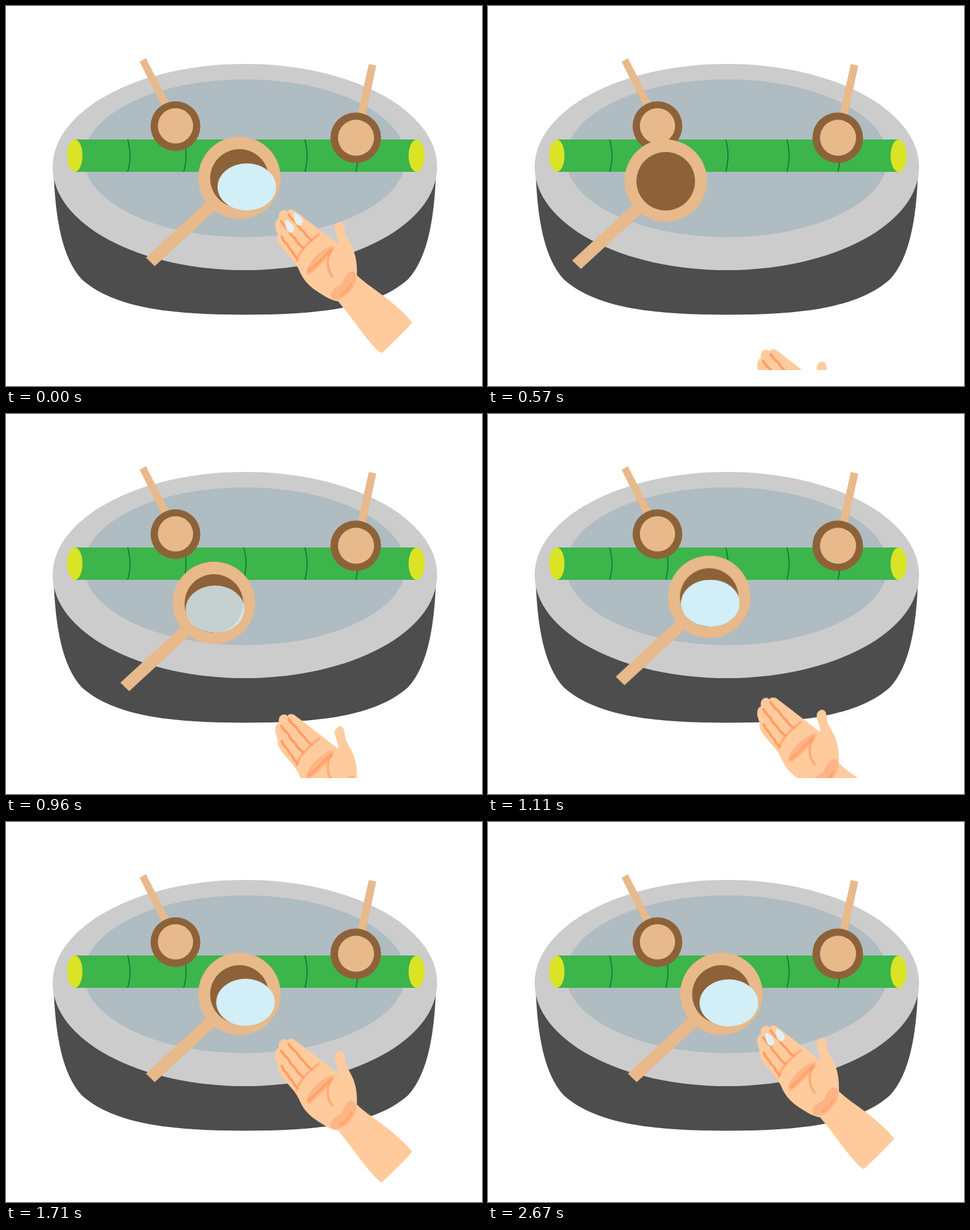
An HTML page without scripts for the animation above (2.7 s loop, 837 by 669 pixels).

```html
<!DOCTYPE html>
<html lang="en">
<head>
<meta charset="utf-8">
<title>Water basin</title>
<style>
  html, body { margin: 0; width: 100%; height: 100%; overflow: hidden; background: #fff; }
  svg { display: block; width: 837px; height: 669px; }

  .ladle, .water, .hand, .drop { animation: 2.7s step-end infinite; }
  .ladle { animation-name: scoop; }
  .water { animation-name: pour; }
  .hand { animation-name: rise; }
  .splash { animation-name: splash; }
  .trickle { animation-name: trickle; }
  .bead { animation-name: bead; }

  .wood { fill: #e8b98a; }
  .bark { fill: #8e6239; }
  .line { fill: none; stroke: #ff9f65; stroke-width: 4.5; stroke-linecap: round; stroke-linejoin: round; }

  @keyframes scoop {
    0% { transform: none; }
    16.66% { transform: translate(-109px, -6px); animation-timing-function: steps(4); }
    21.11% { transform: translate(-98px, 5px); animation-timing-function: steps(4); }
    25.55% { transform: translate(-84px, 18.5px); animation-timing-function: steps(4); }
    29.99% { transform: translate(-68px, 29.5px); animation-timing-function: steps(2); }
    32.22% { transform: translate(-59.5px, 31.5px); animation-timing-function: steps(4); }
    36.66% { transform: translate(-40px, 29.5px); animation-timing-function: steps(4); }
    41.11% { transform: translate(-21.5px, 19.5px); animation-timing-function: steps(4); }
    45.55% { transform: translate(-8px, 8px); animation-timing-function: steps(4); }
    49.99%, 100% { transform: none; }
  }

  /* offsets are relative to the ladle */
  @keyframes pour {
    0% { transform: none; opacity: 1; }
    16.66% { transform: translate(-11px, -5px); opacity: 0; }
    26.66% { transform: translate(-11px, -5px); opacity: 0; animation-timing-function: steps(10); }
    37.77% { transform: translate(-11px, -5px); opacity: 1; }
    51.11% { transform: translate(-11px, -5px); opacity: 1; animation-timing-function: steps(14); }
    66.66%, 100% { transform: none; opacity: 1; }
  }

  @keyframes rise {
    0% { transform: none; }
    16.66% { transform: translateY(269.5px); animation-timing-function: steps(46); }
    67.77%, 100% { transform: none; }
  }

  @keyframes splash {
    0% { transform: translate(484px, 380px); opacity: 0; }
    76.66% { transform: translate(484px, 380px); opacity: 1; }
    77.77% { transform: translate(487px, 385px); opacity: 1; }
    78.88% { transform: translate(491px, 390px); opacity: 1; }
    84.44%, 100% { transform: translate(491px, 390px); opacity: 0; }
  }

  @keyframes trickle {
    0%, 100% { transform: translate(498.5px, 387.5px); opacity: 1; }
    1.11% { transform: translate(501.5px, 392.5px); opacity: 1; }
    2.22% { transform: translate(480px, 357.5px); opacity: 0; }
    93.33% { transform: translate(480px, 357.5px); opacity: 1; animation-timing-function: steps(5); }
    98.88% { transform: translate(495.5px, 382.5px); opacity: 1; }
  }

  @keyframes bead {
    0% { transform: translate(513.5px, 375px); opacity: 1; }
    11.11% { transform: translate(480px, 350px); opacity: 0; }
    84.44% { transform: translate(480px, 350px); opacity: 1; animation-timing-function: steps(8); }
    93.33%, 100% { transform: translate(513.5px, 375px); opacity: 1; }
  }
</style>
</head>
<body>
<svg viewBox="0 0 837 669">
  <defs>
    <path id="joint" d="M0 235Q8 263 0 292" fill="none" stroke="#006837" stroke-width="1.4"/>
    <path id="drop" d="M-7-11.5C-8.5-3-6.500 5-2 9.500C2 13 8 10 8.500 4C7.500-3 0-9-7-11.500Z" fill="#e1f0f3"/>
    <clipPath id="stage"><path d="M0 0H837V641H0Z"/></clipPath>
  </defs>

  <!-- basin -->
  <path d="M84 296C87 376 99 444 133 481C190 532 290 543.500 420 543.500S650 532 707 481C741 444 753 376 756 296Z" fill="#4d4d4d"/>
  <ellipse cx="420" cy="283.500" rx="338" ry="181.500" fill="#ccc"/>
  <ellipse cx="420" cy="268" rx="283" ry="139" fill="#afbcc2"/>

  <!-- bamboo -->
  <path d="M121 235H722V292H121Z" fill="#3cb54a"/>
  <use href="#joint" x="214"/>
  <use href="#joint" x="312.500"/>
  <use href="#joint" x="418"/>
  <use href="#joint" x="525.500"/>
  <use href="#joint" x="615"/>
  <g fill="#dae324">
    <ellipse cx="121" cy="263.500" rx="13.500" ry="28.500"/>
    <ellipse cx="722" cy="263.500" rx="14" ry="28.500"/>
  </g>

  <!-- resting ladles -->
  <path class="wood" d="M235 98L246 92L288 174L276 180Z"/>
  <circle class="bark" cx="298" cy="211.500" r="43.700"/>
  <circle class="wood" cx="298" cy="211" r="31"/>
  <path class="wood" d="M638 102L651 105L632 194L618 192Z"/>
  <circle class="bark" cx="615" cy="232" r="44.500"/>
  <circle class="wood" cx="615.500" cy="232" r="31.700"/>

  <g class="ladle">
    <path class="wood" d="M246 443L358 340L374 354L261.500 458Z"/>
    <circle class="wood" cx="410.500" cy="302.500" r="72.500"/>
    <circle class="bark" cx="410.500" cy="303.500" r="51.500"/>
    <ellipse class="water" cx="423.500" cy="318.500" rx="51.500" ry="41.500" fill="#d2eef7"/>
  </g>

  <g clip-path="url(#stage)">
    <g class="hand">
      <path fill="#ffcb9d" d="M475 395C472 387 473 376 480 374C478 365 483 359 489 359Q493 359 495 362C498 356 506 358 511 363C530 377 556 398 584 419C585 408 578 400 578 389C580 380 590 376 594 385C597 396 595 402 602 412C613 431 618 446 617 474C632 489 653 501 676 520C690 532 704 544 714 557C706 568 681 592 661 611C653 608 647 599 635 586C617 563 602 541 584 520C573 519 560 511 545 501C530 491 521 479 515 464C508 451 506 450 496 438C487 427 475 416 478 404Z"/>
      <path fill="#ffb486" d="M530 473C524 466 533 453 544 441C557 429 571 420 577 423C579 428 569 439 559 450C548 461 537 473 530 473Z"/>
      <path fill="#ffb486" d="M572 515C569 506 573 498 585 493C594 488 593 478 600 471C606 464 614 466 616 476C617 488 609 500 600 508C592 515 579 520 572 515Z"/>
      <path class="line" stroke-opacity=".65" d="M511 448Q516 433 530 419Q541 409 550 402"/>
      <path class="line" d="M484 379Q490 389 497 394Q500 404 508 409Q513 419 523 426"/>
      <path class="line" d="M497 367Q503 377 511 382Q517 393 525 399Q530 408 538 412"/>
      <path class="line" d="M485 406Q488 415 495 420Q497 427 503 431Q506 440 513 445"/>
      <path class="line" stroke-opacity=".8" stroke-width="3" d="M533 466Q553 449 570 430"/>
      <path class="line" stroke-opacity=".7" d="M573 430C563 443 563 462 574 476"/>
      <path class="line" stroke-opacity=".7" d="M588 510Q598 503 607 490"/>
    </g>
  </g>

  <use class="drop splash" href="#drop"/>
  <use class="drop trickle" href="#drop"/>
  <use class="drop bead" href="#drop"/>
</svg>
</body>
</html>
```
